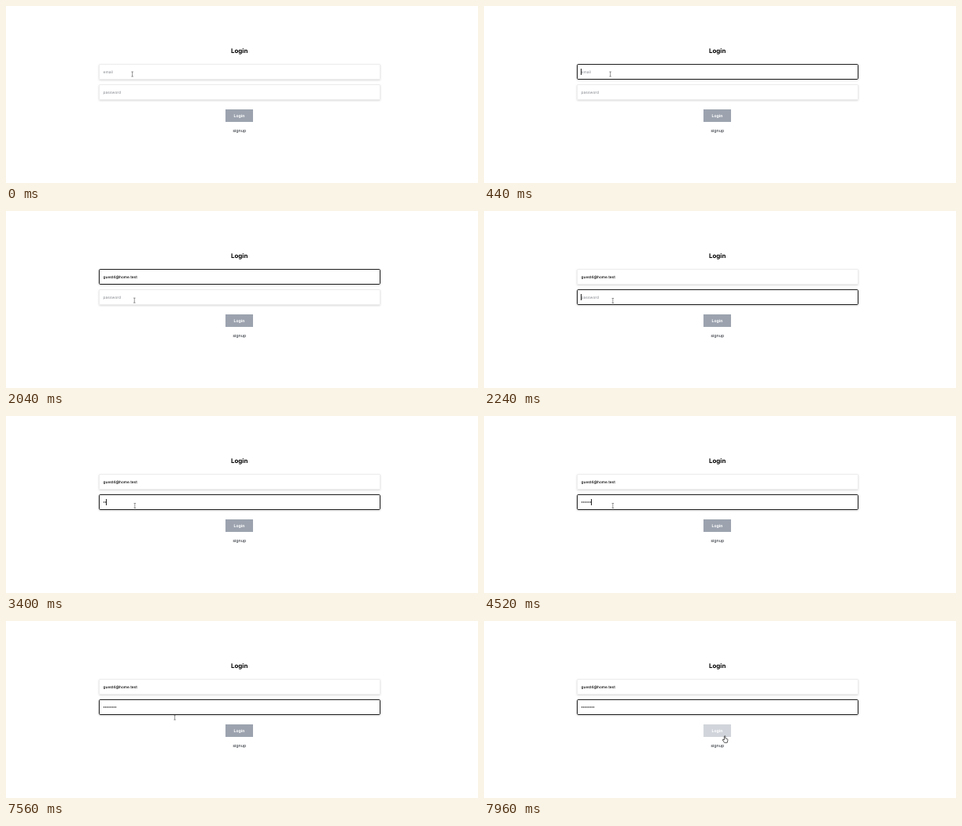
Recreate the animation shown at these times as an HTML page. Size 600 by 226 pixels, loop 8 s.

```html
<!DOCTYPE html>
<html lang="en">
<head>
<meta charset="utf-8">
<title>Login form</title>
<style>
  html, body { margin: 0; width: 100%; height: 100%; overflow: hidden; background: #fff; }
  svg { display: block; width: 100%; height: 100%; }
  text { font-family: Inter, "Open Sans", sans-serif; font-size: 4.8px; font-weight: 500; text-rendering: geometricPrecision; }
  .mid { text-anchor: middle; }
  .hint { fill: #92959b; }
  .field { fill: #fff; stroke: #ececee; filter: url(#soft); }
  .ring { fill: none; stroke: #1c1c1c; }
</style>
</head>
<body>
<svg viewBox="0 0 600 226" xmlns="http://www.w3.org/2000/svg">
  <defs>
    <filter id="soft" x="-5%" y="-30%" width="110%" height="180%">
      <feDropShadow dx="0" dy="1" stdDeviation=".9" flood-color="#000" flood-opacity=".15"/>
    </filter>
  </defs>
  <rect width="600" height="226" fill="#fff"/>
  <text class="mid" x="296.7" y="59.7" style="font-size:7.9px;font-weight:700">Login</text>

  <rect class="field" x="118.5" y="74.5" width="357" height="19" rx=".6"/>
  <rect class="field" x="118.5" y="100.5" width="357" height="19" rx=".6"/>
  <rect class="ring" id="ring" x="118.5" width="357" height="19" rx="1.2"/>

  <text class="hint" id="emailHint" x="123.6" y="85.8">email</text>
  <text id="email" x="123.6" y="85.8" style="font-size:4.75px">guest4@home.test</text>
  <text class="hint" id="passHint" x="123.6" y="111.8">password</text>
  <g id="dots"></g>
  <rect id="caret" width="1" height="8" fill="#222"/>

  <rect id="button" x="279" y="132" width="35" height="16"/>
  <text class="mid" x="296.5" y="141.8" fill="#fff" style="font-size:5.1px;font-weight:700">Login</text>
  <text class="mid" x="296.7" y="160.6" fill="#3c4148" style="font-size:5.3px">signup</text>

  <g id="cursor">
    <path id="beam" d="M-1.3-3H1.3M0-3V3M-1.3 3H1.3" fill="none" stroke="#444" stroke-width=".55"/>
    <path id="arrow" d="M0 0V7L1.6 5.5 2.7 8 3.8 7.5 2.7 5.1H5Z" fill="#fff" stroke="#111" stroke-width=".6"/>
    <path id="hand" d="M-.8-3.3Q0-4.2.7-3.3V-.7L3 .1Q4 .5 3.7 1.8L3 4.8H-.6L-2.9 1.5Q-3-.1-.8 1.3Z" fill="#fff" stroke="#111" stroke-width=".7" stroke-linejoin="round"/>
  </g>
</svg>
<script>
const LOOP = 8000;
const EMAIL_FOCUS = 200, EMAIL_FILLED = 1200, PASS_FOCUS = 2240;
const PITCH = 2.13;
const BLINK = 1080, LIT = 520;
const HOVER = 7800, FADE = 150;

const $ = id => document.getElementById(id);
const show = (el, on) => el.setAttribute('visibility', on ? 'visible' : 'hidden');
const clamp = v => Math.max(0, Math.min(1, v));
const lerp = (a, b, k) => a + (b - a) * k;
const easeInOut = k => k < .5 ? 4 * k ** 3 : 1 - 4 * (1 - k) ** 3;

// Five steady keystrokes, then three hesitant ones.
const keyTimes = [...Array.from({ length: 5 }, (_, i) => 2840 + 290 * i), 4520, 6240, 6920];

$('dots').innerHTML = keyTimes.map((_, i) =>
  `<circle cx="${124.6 + i * PITCH}" cy="110" r=".68"/>`).join('');
const dots = [...$('dots').children];

// First a bowed move between the fields, then a sweep to the button.
function mouseAt(t) {
  const down = easeInOut(clamp((t - 1360) / 800));
  const out = clamp((t - 7400) / 560);
  return [
    lerp(160.6, 163.8, down) - 12 * Math.sin(Math.PI * down) + 142.4 * (1 - (1 - out) ** 1.3),
    lerp(87, 114.5, down) + 36 * out ** 1.15
  ];
}

// The blink restarts on every focus change and keystroke.
function caretLit(t) {
  const last = Math.max(...[EMAIL_FOCUS, PASS_FOCUS, ...keyTimes].filter(e => e <= t));
  const editing = t >= EMAIL_FOCUS && (t < EMAIL_FILLED || t >= PASS_FOCUS);
  return editing && (t - last) % BLINK < LIT;
}

function mix(from, to, k) {
  return `rgb(${from.map((v, i) => Math.round(lerp(v, to[i], k)))})`;
}

function draw(t) {
  const onPass = t >= PASS_FOCUS;
  const typed = keyTimes.filter(k => t >= k).length;

  show($('ring'), t >= EMAIL_FOCUS);
  $('ring').setAttribute('y', onPass ? 100.5 : 74.5);
  show($('emailHint'), t < EMAIL_FILLED);
  show($('email'), t >= EMAIL_FILLED);
  show($('passHint'), !typed);
  dots.forEach((dot, i) => show(dot, i < typed));

  show($('caret'), caretLit(t));
  $('caret').setAttribute('x', 123 + Math.round(typed * PITCH));
  $('caret').setAttribute('y', onPass ? 106 : 80);

  const [x, y] = mouseAt(t);
  const overButton = x >= 279;
  const overField = y < 124;
  $('cursor').setAttribute('transform', `translate(${x} ${y})`);
  show($('hand'), overButton);
  show($('beam'), overField);
  show($('arrow'), !overField && !overButton);
  $('button').setAttribute('fill',
    mix([156, 163, 175], [209, 213, 219], clamp((t - HOVER) / FADE)));
}

const start = performance.now();
function tick() {
  draw((performance.now() - start) % LOOP);
  requestAnimationFrame(tick);
}
draw(0);
requestAnimationFrame(tick);
</script>
</body>
</html>
```
